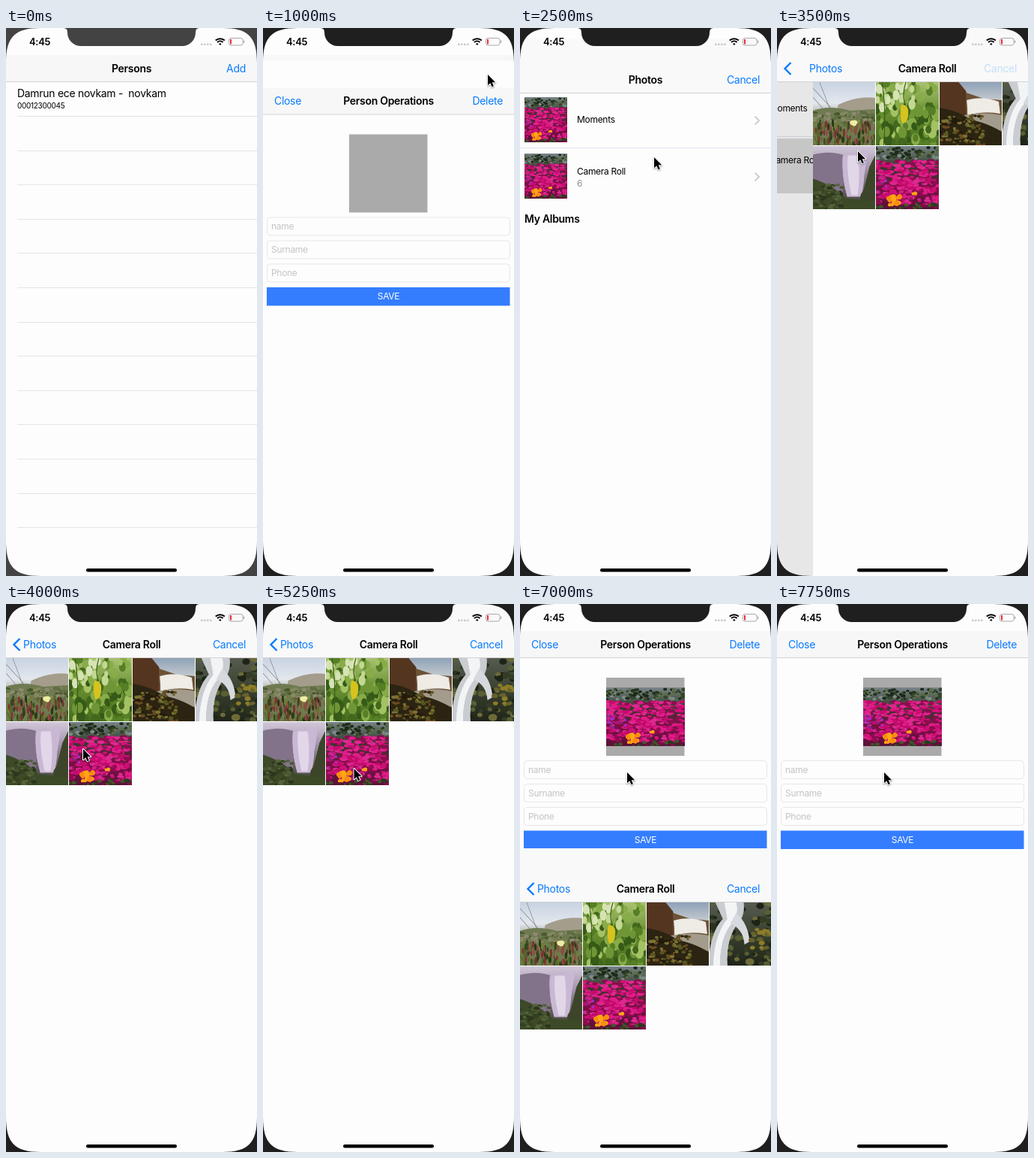
These frames come from a looping animation (335 px wide and 729 px high, 8 s). An HTML page with a canvas:

```html
<!DOCTYPE html>
<html lang="en">
<head>
<meta charset="utf-8">
<style>
html, body { margin: 0; width: 335px; height: 729px; overflow: hidden; background: #fff; }
canvas { display: block; }
</style>
</head>
<body>
<canvas id="stage" width="335" height="729"></canvas>
<script>
const W = 335, H = 729, LOOP = 8000, STEP = 250;
const BLUE = '#087aff', PAPER = '#fdfdfd';
const c = document.getElementById('stage').getContext('2d');

function rect(x, y, w, h, color) {
  c.fillStyle = color;
  c.fillRect(x, y, w, h);
}
function text(s, x, y, size, color = '#000', weight = 400, align = 'left') {
  c.font = `${weight} ${size}px Inter, sans-serif`;
  c.letterSpacing = '-0.3px';
  c.textAlign = align;
  c.fillStyle = color;
  c.fillText(s, x, y);
}
function line(points, color, width) {
  c.beginPath();
  points.forEach(([x, y]) => c.lineTo(x, y));
  c.strokeStyle = color;
  c.lineWidth = width;
  c.stroke();
}
function shifted(x, y, draw) {
  c.save();
  c.translate(x, y);
  draw();
  c.restore();
}
// Share of the way still to go, for a critically damped spring.
function remaining(ms) {
  const k = Math.max(0, ms) * 0.0151;
  return (1 + k) * Math.exp(-k);
}

// Photos: 112 x 84, the middle 84 x 84 serves as thumbnail.
function photo(seed, paint) {
  const canvas = document.createElement('canvas');
  canvas.width = 224;
  canvas.height = 168;
  const g = canvas.getContext('2d');
  g.scale(2, 2);
  g.translate(14, 0);
  const rnd = () => (seed = seed * 16807 % 2147483647) / 2147483647;
  for (let i = 0; i < 5; i++) rnd();
  paint({
    sky(...colors) {
      const fill = g.createLinearGradient(0, 0, 0, 84);
      colors.forEach((color, i) => fill.addColorStop(i / (colors.length - 1), color));
      g.fillStyle = fill;
      g.fillRect(-14, 0, 112, 84);
    },
    shape(color, d) {
      g.fillStyle = color;
      g.fill(new Path2D(d));
    },
    stroke(color, width, d) {
      g.strokeStyle = color;
      g.lineWidth = width;
      g.stroke(new Path2D(d));
    },
    spots(n, colors, x, y, w, h, rx, ry = rx) {
      for (let i = 0; i < n; i++) {
        g.fillStyle = colors[i % colors.length];
        g.beginPath();
        const size = 0.5 + rnd() * 0.7;
        g.ellipse(x + rnd() * w, y + rnd() * h, rx * size, ry * size, 0, 0, 7);
        g.fill();
      }
    }
  });
  return canvas;
}

const meadow = photo(11, p => {
  p.sky('#c9d3e2', '#e4e8ee', '#7b7d66', '#3c4a26');
  p.shape('#a49d8c', 'M34 30 Q60 18 84 21 V50 H30z');
  p.shape('#6f7a50', 'M0 38 Q22 30 50 38 L84 36 V84 H0z');
  p.stroke('#7f858b', 0.7, 'M0 8 L26 36 M0 20 L14 36 M9 0 L22 34');
  p.spots(70, ['#5f6e42', '#87895f', '#49582f', '#8f8a72'], 0, 40, 84, 14, 3, 2);
  p.spots(170, ['#37491f', '#6f7c3a', '#7a3434', '#2a3818', '#8d4d45', '#56682c'], 0, 54, 84, 30, 1.5, 5);
  p.spots(5, ['#eeeda2'], 50, 52, 7, 5, 4, 3);
});
const leaf = photo(23, p => {
  p.sky('#a8c272', '#668d30', '#466d1c');
  p.spots(130, ['#88ac48', '#41681c', '#6f9636', '#567f26', '#a4c264', '#365a17'], 0, 0, 84, 84, 5, 7);
  p.spots(16, ['#d6e3b4', '#c3d892'], 0, 0, 50, 34, 4, 6);
  p.stroke('#3d5d1a', 1.2, 'M40 0 Q34 20 40 30 M8 0 Q14 40 10 84');
  p.shape('#d6c31f', 'M34 30 Q45 30 43 44 Q42 54 35 55 Q31 42 34 30z');
});
const cliff = photo(37, p => {
  p.sky('#8fa2b8', '#ccd0d2', '#9c8e78', '#5d5340');
  p.shape('#54351f', 'M0 0 H26 L36 12 L42 44 H0z');
  p.shape('#6d5236', 'M36 14 L60 22 L84 24 V46 H36z');
  p.shape('#efebe5', 'M37 24 Q58 18 80 26 L82 42 Q60 38 38 44z');
  p.shape('#a39b8c', 'M34 44 Q60 39 84 44 V64 H34z');
  p.shape('#2c2412', 'M0 34 Q26 38 42 50 Q64 54 84 66 V84 H0z');
  p.spots(130, ['#575522', '#221a0c', '#6b4c22', '#7a7230', '#31290f'], 0, 44, 60, 40, 3, 2);
});
const stream = photo(41, p => {
  p.sky('#565c50', '#3a412f', '#20251a');
  p.spots(90, ['#343c24', '#575f34', '#1e2416', '#6d6c38', '#2a311d'], 0, 0, 84, 84, 5, 4);
  p.shape('#c9cdd1', 'M8 0 H46 Q48 16 40 26 Q22 46 24 84 H0 V66 Q4 36 18 22z');
  p.shape('#f3f4f5', 'M20 0 H36 Q40 16 30 28 Q14 46 14 84 H5 Q6 44 24 22z');
  p.shape('#d6d9dd', 'M36 14 Q52 28 54 52 L47 56 Q46 36 28 28z');
  p.spots(24, ['#8d7d28', '#66622b'], 56, 34, 26, 30, 3.5, 2.5);
});
const falls = photo(53, p => {
  p.sky('#d3c9da', '#a898b2', '#6c6468', '#343d27');
  p.shape('#82738a', 'M0 12 Q24 6 42 13 L40 64 H0z');
  p.shape('#c9b8d4', 'M40 13 L74 8 L69 40 Q68 60 64 68 H46 Q38 40 40 13z');
  p.shape('#e2d7e8', 'M47 13 H60 Q64 40 60 66 H52 Q45 38 47 13z');
  p.shape('#3c4529', 'M84 12 L76 28 L68 60 Q54 74 84 84z');
  p.shape('#3c4a28', 'M0 44 Q26 52 44 70 L84 74 V84 H0z');
  p.spots(70, ['#34401f', '#56643a', '#495634', '#2c361d'], 0, 52, 40, 32, 3.5, 2);
});
const flowers = photo(67, p => {
  p.sky('#79858b', '#303d29', '#7a0f46', '#5a1238');
  p.spots(110, ['#24331f', '#5c6f4a', '#7d8a86', '#36462c', '#1d2a19'], -14, 2, 112, 16, 3, 2.2);
  p.spots(420, ['#d3107a', '#e01c88', '#c40c6c', '#8e0c4e', '#dc2a90'], -14, 20, 112, 58, 4.5, 2.2);
  p.spots(22, ['#a82bcb', '#752b93'], -14, 38, 28, 26, 1.8);
  p.spots(34, ['#2c3c20', '#46552b', '#7d0f48'], -14, 76, 112, 8, 3, 2);
  p.spots(14, ['#ffa812', '#f98d10'], 17, 67, 15, 12, 3.4);
  p.spots(3, ['#ffa812'], 48, 61, 5, 3, 2.5);
});
const album = [meadow, leaf, cliff, stream, falls, flowers];

function thumb(image, x, y, w, h) {
  c.drawImage(image, 28, 0, 168, 168, x, y, w, h);
}
function navBar(title, left, right) {
  rect(0, 0, W, H, PAPER);
  rect(0, 36, W, 35, '#f7f7f7');
  rect(0, 71, W, 1, '#d2d2d4');
  text(title, 167.5, 58.5, 14, '#000', 600, 'center');
  text(left, 15, 58.5, 14, BLUE);
  text(right, 320, 58.5, 14, BLUE, 400, 'right');
}

function personList() {
  navBar('Persons', '', 'Add');
  text('Damrun ece novkam -  novkam', 15, 92, 14);
  text('00012300045', 15, 106.5, 10);
  for (let i = 0; i < 13; i++) rect(15, Math.round(117 + i * 45.6), W - 15, 1, '#e5e5e7');
}

function personForm(picked) {
  navBar('Person Operations', 'Close', 'Delete');
  rect(115, 98, 104.5, 104, '#aaa');
  if (picked) c.drawImage(flowers, 115, 111, 104.5, 78);
  ['name', 'Surname', 'Phone'].forEach((label, i) => {
    c.beginPath();
    c.roundRect(5.5, 208.5 + i * 31, 324, 24, 4);
    c.strokeStyle = '#e7e7e8';
    c.lineWidth = 1;
    c.stroke();
    text(label, 11, 224.5 + i * 31, 12, '#c4c4c7');
  });
  rect(5, 301.5, 324.5, 24.5, '#347dff');
  text('SAVE', 167.5, 318, 12, '#fff', 400, 'center');
}

function albumList(selected) {
  rect(0, 72, W, H, PAPER);
  if (selected) rect(0, 147, W, 73, '#d9d9d9');
  rect(0, 144, W, 1, '#dfe3ec');
  [77, 152].forEach(y => {
    thumb(flowers, 5.5, y, 57, 60);
    line([[313.5, y + 25.5], [319, y + 31], [313.5, y + 36.5]], '#c5c5c9', 1.7);
  });
  text('Moments', 76, 110.5, 12);
  text('Camera Roll', 76, 179.5, 12);
  text('6', 76, 196, 12, '#8e8e93');
  text('My Albums', 6, 244, 14, '#000', 600);
}

function photoGrid() {
  rect(0, 72, W, H, PAPER);
  album.forEach((image, i) => thumb(image, i % 4 * 84.3, 72 + (i >> 2) * 84.5, 83.3, 84));
}

function picker(t) {
  const rest = remaining(t - 3273);
  if (rest > 0.01) {
    shifted(-0.3 * W * (1 - rest), 0, () => albumList(t >= 3250));
    rect(0, 72, W, H, `rgba(0,0,0,${0.1 * (1 - rest)})`);
  }
  if (rest < 1) shifted(Math.round(W * rest), 0, photoGrid);
  rect(0, 0, W, 71, '#f9f9f9');
  rect(0, 71, W, 1, '#d2d2d4');
  if (rest === 1) {
    text('Photos', 167.5, 58.5, 14, '#000', 600, 'center');
  } else {
    line([[18.5, 46], [10.5, 54], [18.5, 62]], BLUE, 2.4);
    text('Photos', 45 + 140 * rest, 58.5, 14, BLUE, 400, 'center');
    text('Camera Roll', 167.5 + 230 * rest, 58.5, 14, '#000', 600, 'center');
    c.globalAlpha = (1 - rest) ** 10;
  }
  text('Cancel', 320, 58.5, 14, BLUE, 400, 'right');
  c.globalAlpha = 1;
}

function statusBar() {
  text('4:45', 31, 23, 13, '#000', 600);
  for (let i = 0; i < 4; i++) {
    c.beginPath();
    c.arc(261.3 + i * 4, 21.8, 1.4, 0, 7);
    c.fillStyle = '#c6c6c8';
    c.fill();
  }
  c.strokeStyle = '#000';
  c.lineWidth = 2;
  [8.8, 5.5, 1.5].forEach(r => {
    c.beginPath();
    c.arc(285.8, 23, r, -Math.PI * 0.74, -Math.PI * 0.26);
    c.stroke();
  });
  c.beginPath();
  c.roundRect(297.5, 13.5, 18.5, 9.5, 2.6);
  c.strokeStyle = '#a8a8aa';
  c.lineWidth = 1;
  c.stroke();
  rect(317, 16.5, 1.2, 3.5, '#a8a8aa');
  rect(299, 15, 2, 6.5, '#ee2d35');
}

// Screen corners ease into the edges more softly than a circle does.
const corners = new Path2D(`M0 0H${W}V${H}H0z M0 46C0 12 12 0 46 0H${W - 46}c34 0 46 12 46 46
  V${H - 46}c0 34 -12 46 -46 46H46C12 ${H} 0 ${H - 12} 0 ${H - 46}z`);
const notch = new Path2D('M77 0Q82 0 82 6A18 18 0 0 0 100 24H235A18 18 0 0 0 253 6Q253 0 258 0z');
const arrow = new Path2D('M0 0V14.2L3.3 11.2L5.5 16.2L7.9 15.2L5.7 10.3H10.2z');

function bezel(color) {
  c.beginPath();
  c.roundRect(107, 719, 121, 4.5, 2.2);
  c.fillStyle = '#000';
  c.fill();
  c.fillStyle = color;
  c.fill(corners, 'evenodd');
  c.fill(notch);
}

// time, x, y
const path = [
  [250, 312, 95], [500, 308, 56], [1000, 300, 62], [1500, 215, 130], [2000, 179, 172],
  [2500, 179, 172], [3000, 110, 166], [3500, 108, 164], [4000, 103, 193], [5000, 103, 193],
  [5500, 140, 245], [6000, 205, 265], [6250, 212, 215], [6500, 226, 171], [6750, 140, 214],
  [7000, 143, 224], [8000, 143, 224]
];
function cursor(t) {
  const i = path.findIndex(key => key[0] > t);
  if (i < 1) return;
  const [t0, x0, y0] = path[i - 1], [t1, x1, y1] = path[i];
  const k = (t - t0) / (t1 - t0);
  shifted(x0 + (x1 - x0) * k, y0 + (y1 - y0) * k, () => {
    c.lineJoin = 'round';
    c.strokeStyle = '#fff';
    c.lineWidth = 2;
    c.shadowColor = 'rgba(0,0,0,0.4)';
    c.shadowBlur = 2;
    c.shadowOffsetY = 1;
    c.stroke(arrow);
    c.shadowColor = 'transparent';
    c.fillStyle = '#000';
    c.fill(arrow);
  });
}

function draw(t) {
  const formY = H * remaining(t - 700);
  const closing = 1 - remaining(t - 6900);
  const pickerY = H * Math.max(remaining(t - 2116), closing);
  if (formY > 0.5) personList();
  if (formY < H) shifted(0, formY, () => personForm(t > 6500));
  if (pickerY < H - 2) shifted(0, pickerY < 1.5 ? 0 : Math.round(pickerY), () => picker(t));
  statusBar();
  bezel(t < 250 ? '#434343' : '#1f1f1f');
  cursor(t);
}

function tick() {
  draw(Math.floor(performance.now() % LOOP / STEP) * STEP);
  requestAnimationFrame(tick);
}
tick();
</script>
</body>
</html>
```
